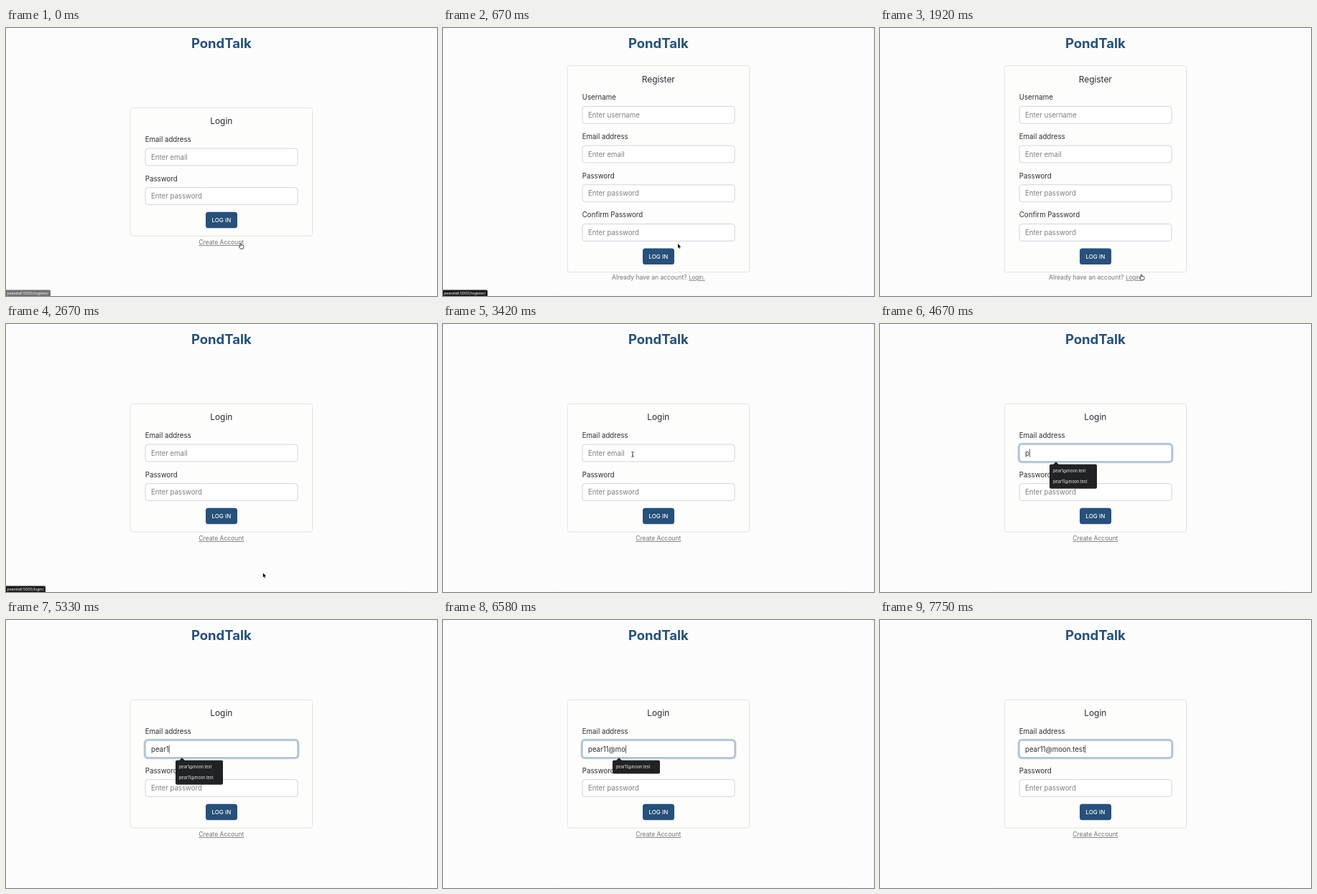
Write an HTML page that moves like this. It is 600 px wide and 374 px high and loops after 8 s.

```html
<!DOCTYPE html>
<html lang="en">
<head>
<meta charset="utf-8">
<title>Login form</title>
<style>
  html, body { margin: 0; height: 100%; overflow: hidden; background: #fcfcfc; }
  svg { display: block; width: 600px; height: 374px; font-family: Inter, "Open Sans", sans-serif; }
  .title { font-size: 18.5px; font-weight: 700; fill: #26507b; }
  .head { font-size: 11.9px; }
  .label { font-size: 9.7px; }
  .field { font-size: 9.65px; }
  .hint { fill: #7b7f83; }
  .button { font-size: 8px; font-weight: 500; fill: #fff; }
  .note { font-size: 8.55px; fill: #777; }
  .link { fill: #6c6c6c; text-decoration: underline; }
  .status { font-size: 5.2px; fill: #fff; }
  .option { font-size: 5.5px; fill: #f1f1f1; }
  text { fill: #2a2d31; white-space: pre; }
</style>
</head>
<body>
<svg id="stage" viewBox="0 0 600 374"></svg>
<script>
const LOOP = 8000, FPS = 0.012;
const stage = document.getElementById('stage');
const EMAIL = 'pear11@moon.test';
const KEY_TIMES = [4580, 4750, 4920, 5000, 5330, 5500, 5920, 6420,
  6580, 6750, 6830, 7000, 7420, 7580, 7670, 7750];
const SAVED = ['chief@moon.test', 'fig@lumenet.test', 'figchessplayers@moon.test',
  'chief2@moon.test', 'pear1@moon.test', EMAIL];
// time, x, y of the pointer
const PATH = [[0, 327, 301], [920, 327, 301], [1750, 372, 348], [1920, 364, 344.5],
  [2170, 357.8, 347.5], [2750, 357.8, 347.5], [3420, 264, 182], [LOOP, 264, 182]];
const PAGES = {
  login: {
    top: 111.4, head: 'Login',
    fields: [['Email address', 'Enter email'], ['Password', 'Enter password']],
    link: [268, 294, 64, 11]
  },
  register: {
    top: 52.7, head: 'Register',
    fields: [['Username', 'Enter username'], ['Email address', 'Enter email'],
      ['Password', 'Enter password'], ['Confirm Password', 'Enter password']],
    link: [342, 343, 23, 11]
  }
};

const text = (cls, x, y, str, extra = '') =>
  `<text class="${cls}" x="${x}" y="${y}" ${extra}>${str}</text>`;
const centred = (cls, y, str) => text(cls, 299.8, y, str, 'text-anchor="middle"');
const rect = ([x, y, w, h], r, attrs) =>
  `<rect x="${x}" y="${y}" width="${w}" height="${h}" rx="${r}" ${attrs}/>`;
const within = ([x, y, w, h], px, py) => px >= x && px <= x + w && py >= y && py <= y + h;
const ramp = (t, start, length) => Math.min(1, Math.max(0, (t - start) / length));

const inputBox = (page, i) => [194, page.top + 56.7 + 54.7 * i, 212, 23.8];
const buttonBox = page => [278, inputBox(page, page.fields.length)[1] - 20.7, 44, 22.5];

function pointer(t) {
  const i = PATH.findIndex(k => k[0] > t);
  const [t0, x0, y0] = PATH[i - 1], [t1, x1, y1] = PATH[i];
  const p = (t - t0) / (t1 - t0), e = p * p * (3 - 2 * p);
  return [x0 + (x1 - x0) * e, y0 + (y1 - y0) * e];
}

function drawPointer(page, t) {
  const [x, y] = pointer(t);
  let shape;
  if (page.fields.some((f, i) => within(inputBox(page, i), x, y)))
    shape = `<path d="M-1.7-3.6Q0-3.6 0-2.6Q0-3.6 1.7-3.6M0-2.8V2.8M-1.7 3.6Q0 3.6 0 2.6Q0 3.6 1.7 3.6M-.8 1H.8"
      fill="none" stroke="#222" stroke-width=".8"/>`;
  else if (within(page.link, x, y) || within(buttonBox(page), x, y))
    shape = `<path d="M-1-.2Q-.3-1 .4-.2V2.2Q1-.1 1.7 2.3Q2.5 1.6 2.9 2.6Q3.7 2.2 3.9 3.2V5L3.1 7.2H-.6L-2.5 4.4Q-2.6 3.2-1 4Z"
      fill="#fff" stroke="#222" stroke-width=".8" stroke-linejoin="round"/>`;
  else
    shape = `<path d="M0 0V6L1.3 4.8 2.3 7 3.2 6.6 2.3 4.5H4.2Z"
      fill="#000" stroke="#fff" stroke-width=".9" paint-order="stroke"/>`;
  return `<g transform="translate(${x} ${y})">${shape}</g>`;
}

function drawPage(page, typed, focus) {
  const { top, head, fields } = page;
  const button = buttonBox(page), bottom = button[1] + 33.3;
  let out = rect([173.2, top, 253.4, bottom - top], 3, 'fill="#fdfdfc" stroke="#dfdfd8" stroke-width=".9"')
    + centred('head', top + 22.9, head);
  fields.forEach(([label, hint], i) => {
    const box = inputBox(page, i), y = box[1], active = i === 0 && focus > 0;
    if (active)
      out += rect([192.9, y - 1.1, 214.2, 26], 4.6, `fill="none" stroke="#bccddd" stroke-width="2.6" opacity="${focus}"`);
    out += text('label', 193.8, y - 9.2, label)
      + rect(box, 3.6, `fill="#fff" stroke="${active ? '#8ba3bb' : '#cdd0d4'}" stroke-width=".9"`)
      + (active && typed
        ? text('field', 202, y + 15.6, typed, 'id="typed"')
        : text('field hint', 202, y + 15.6, hint, 'style="fill:#7b7f83"'));
  });
  out += rect(button, 3.6, 'fill="#27507a"')
    + text('button', 299.8, button[1] + 14.4, 'LOG IN', 'text-anchor="middle" style="fill:#fff"');
  const grey = 'style="fill:#747474"';
  return out + (page === PAGES.login
    ? text('note link', 299.8, 302, 'Create Account', 'text-anchor="middle" ' + grey)
    : text('note', 235, 351.2, 'Already have an account?', grey)
      + text('link', 342.3, 351.2, 'Login.', 'font-size="7.7" ' + grey));
}

function drawOptions(typed) {
  const list = SAVED.filter(s => s.startsWith(typed));
  const height = 3.5 + 15.25 * list.length;
  return '<path d="M241 196.2L245 192.3L249 196.2Z" fill="#202223"/>'
    + rect([236, 195.8, typed ? 66 : 91.3, height], 2, 'fill="#202223"')
    + list.map((s, i) => text('option', 241, 207.1 + 15.25 * i, s, 'style="fill:#f1f1f1"')).join('');
}

function drawStatus(path, width, opacity) {
  return `<g opacity="${opacity}">`
    + `<path d="M0 365.6H${width - 2}q2 0 2 2V374H0Z" fill="#1c1c1c"/>`
    + text('status', 1.5, 371.7, 'pearstall:5000/' + path, 'style="fill:#fff"') + '</g>';
}

function draw(now) {
  // the screen updates twelve times a second
  const t = (Math.floor((now % LOOP + 4) * FPS) / FPS + 4) % LOOP;
  const page = t >= 670 && t < 2580 ? PAGES.register : PAGES.login;
  const typed = EMAIL.slice(0, KEY_TIMES.filter(k => t >= k).length);
  const focus = t >= 3670 ? 0.5 + ramp(t, 3670, 160) / 2 : 0;

  let out = '<defs><linearGradient id="shade" x2="0" y2="1"><stop stop-color="#fcfcfc"/>'
    + '<stop offset="1" stop-color="#f0f0f0"/></linearGradient></defs>'
    + rect([156, 371.5, 408, 4], 2, 'fill="url(#shade)"')
    + text('title', 299.8, 27.9, 'PondTalk', 'text-anchor="middle" style="fill:#26507b"')
    + drawPage(page, typed, focus);
  if (t >= 3750 && typed !== EMAIL) out += drawOptions(typed);
  if (t < 1500) out += drawStatus('register/', 62, t < 80 ? 0.62 : t < 1420 ? 1 : 0.5);
  if (t >= 2330 && t < 3330) out += drawStatus('login/', 55, t < 2420 || t >= 3250 ? 0.5 : 1);
  if (!typed) out += drawPointer(page, t);
  stage.innerHTML = out;

  if (typed || (t >= 3670 && t < 4170)) {
    const node = document.getElementById('typed');
    const x = 202.3 + (node ? node.getComputedTextLength() : 0);
    stage.insertAdjacentHTML('beforeend', rect([x, 174.6, 0.7, 11.2], 0, 'fill="#222"'));
  }
}

const start = performance.now();
function tick() {
  draw(performance.now() - start);
  requestAnimationFrame(tick);
}
tick();
</script>
</body>
</html>
```
